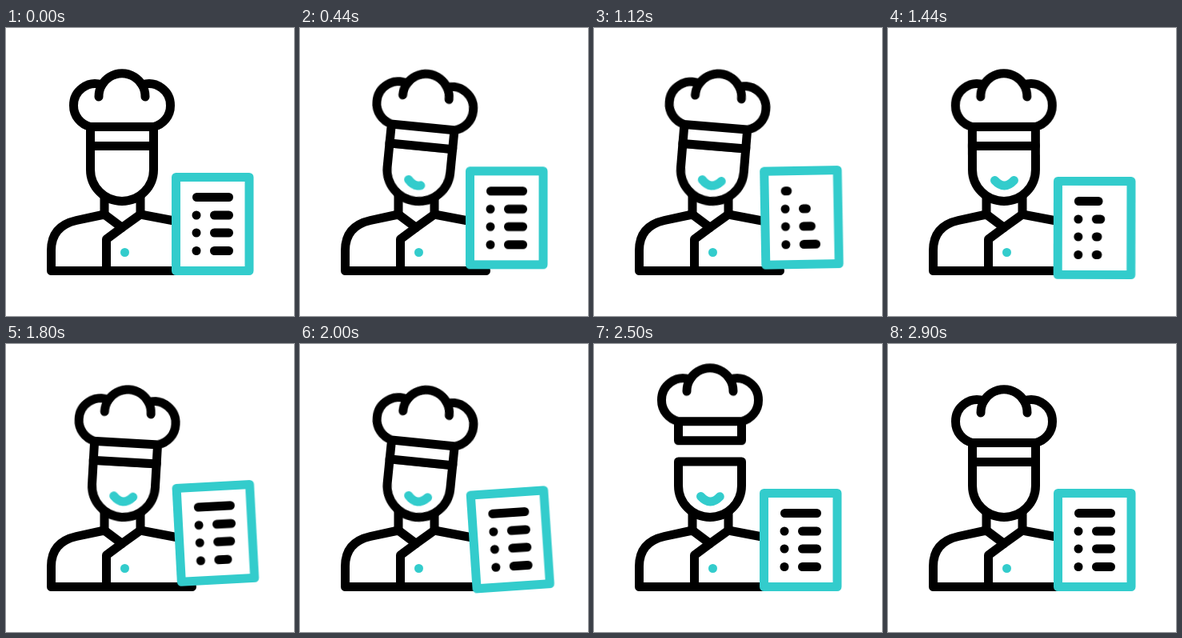
An HTML page that plays this animation: 360 px wide and 360 px high, repeating every 3080 ms.

```html
<!DOCTYPE html>
<html lang="en">
<head>
<meta charset="utf-8">
<title>Chef with menu</title>
<style>
  html, body { margin: 0; width: 100%; height: 100%; overflow: hidden; background: #fff; }
  svg { display: block; width: 100vw; height: 100vh; }

  .ink, .teal { fill: none; stroke: #000; stroke-width: 11; stroke-linecap: round; stroke-linejoin: round; }
  .teal { stroke: #3cc; }
  .solid { fill: #fff; }
  .dot { stroke: none; fill: #000; }
  .teal-dot { fill: #3cc; }

  .head, .hat, .bob, .tilt, .bar, .smile {
    animation: 3080ms cubic-bezier(.37, 0, .63, 1) infinite both;
  }
  .head { animation-name: sway; transform-origin: 145px 212px; }
  .hat  { animation-name: lift; }
  .bob  { animation-name: bob; }
  .tilt { animation-name: tilt; transform-origin: 258.5px 176px; }
  .bar  { animation-name: rewrite; stroke-dasharray: 1 3; animation-delay: calc(var(--i) * 120ms); }
  .smile { animation-name: smile; stroke-dasharray: 1 3; }

  @keyframes sway {
    0%, 7.79%, 79.22%, 100% { transform: rotate(0deg); }
    16.23%, 39.61%, 62.99%  { transform: rotate(6.4deg); }
    27.92%, 51.3%, 74.68%   { transform: rotate(-3.2deg); }
  }
  @keyframes lift {
    0%, 75.32%, 93.51%, 100% { transform: translateY(0); }
    84.42% { transform: translateY(-37px); }
  }
  @keyframes bob {
    0%, 7.79%, 79.22%, 100% { transform: translateY(0); }
    12.34%, 35.06%, 58.44%  { transform: translateY(-8.5px); }
    23.38%                  { transform: translateY(2.5px); }
    46.75%, 70.13%          { transform: translateY(5px); }
  }
  @keyframes tilt {
    0%, 15.58%, 77.92%, 100% { transform: rotate(0deg); }
    20.45%, 41.23%, 62.01%   { transform: rotate(-5.8deg); }
    30.84%, 51.62%, 72.4%    { transform: rotate(4.9deg); }
  }
  @keyframes rewrite {
    0%, 20.13%, 54.55%, 100% { stroke-dashoffset: 0; }
    37.01% { stroke-dashoffset: .94; }
  }
  @keyframes smile {
    0%, 9.74%      { stroke-dashoffset: .99; opacity: 0; }
    9.75%          { stroke-dashoffset: .99; opacity: 1; }
    17.53%, 80.52% { stroke-dashoffset: 0; opacity: 1; }
    90.91%         { stroke-dashoffset: .99; opacity: 1; }
    90.92%, 100%   { stroke-dashoffset: .99; opacity: 0; }
  }
</style>
</head>
<body>
<svg viewBox="0 0 360 360">
  <g class="ink">
    <path d="M232.5 303.5H56.5V278C56.5 257 68 245 88 240.5L123 233L145 249.5L168 233L226 244"/>
    <path d="M123 204V233M168 204V233M145 249.5L125.5 264V303.5"/>
    <circle class="dot teal-dot" cx="148.5" cy="280.5" r="5.5"/>
  </g>

  <g class="head ink">
    <path class="solid" d="M105.5 147V177A39.5 39.5 0 0 0 184.5 177V147Z"/>
    <path class="smile teal" pathLength="1" d="M133.5 190.5Q145.5 203.5 157.5 190.5"/>
    <g class="hat">
      <path class="solid" d="M105.5 123.5H184.5V147.5H105.5Z"/>
      <path class="solid" d="M105.5 123.5A27 27 0 0 1 84.5 97A27 27 0 0 1 120 71A29 29 0 0 1 170 71A27 27 0 0 1 205.5 97A27 27 0 0 1 184.5 123.5Z"/>
      <path d="M116 86A29 29 0 0 1 120 71M174 86A29 29 0 0 0 170 71"/>
    </g>
  </g>

  <g class="bob">
    <g class="tilt ink">
      <rect class="teal solid" x="212.5" y="186.5" width="91.5" height="117"/>
      <path class="bar" style="--i:0" pathLength="1" d="M238.5 211.5H278.5"/>
      <path class="bar" style="--i:1" pathLength="1" d="M260.5 234H278.5"/>
      <path class="bar" style="--i:2" pathLength="1" d="M260.5 256H278.5"/>
      <path class="bar" style="--i:3" pathLength="1" d="M260.5 278.5H278.5"/>
      <circle class="dot" cx="238" cy="234" r="5.5"/>
      <circle class="dot" cx="238" cy="256" r="5.5"/>
      <circle class="dot" cx="238" cy="278.5" r="5.5"/>
    </g>
  </g>
</svg>
</body>
</html>
```
